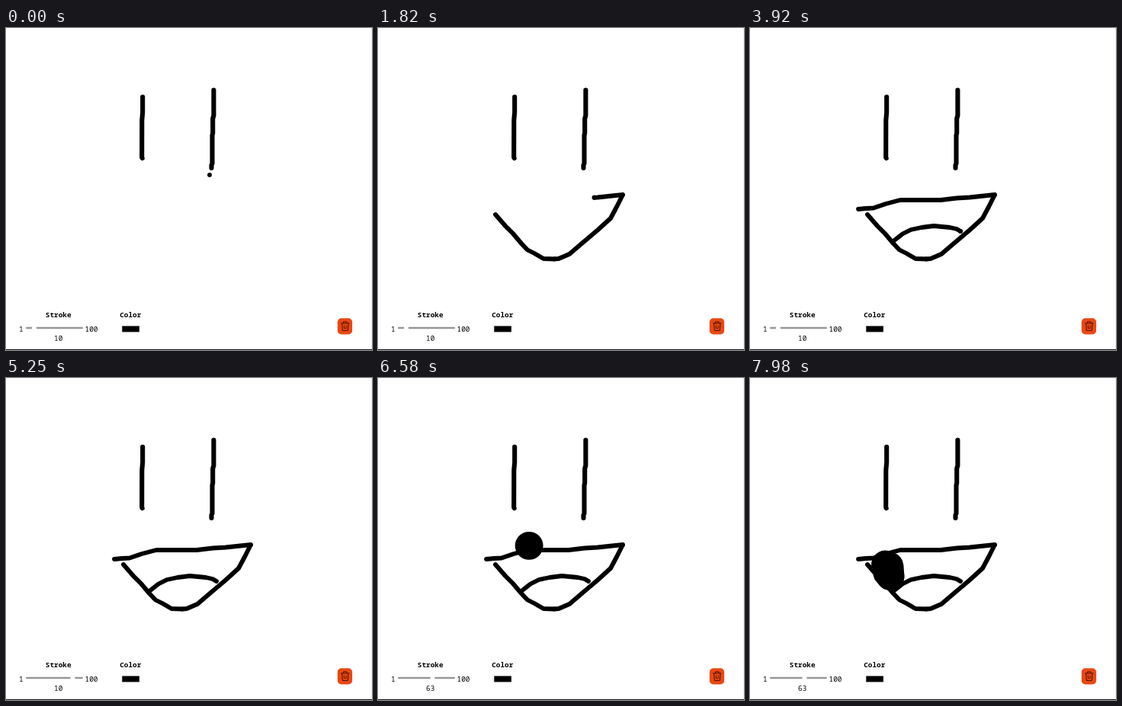
Recreate the animation shown at these times as an HTML page. Size 480 px wide and 423 px high, loop 8 s.

```html
<!DOCTYPE html>
<html lang="en">
<head>
<meta charset="utf-8">
<title>Drawing board</title>
<style>
  html, body { margin: 0; width: 100%; height: 100%; overflow: hidden; background: #fff; }
  svg { display: block; width: 480px; height: 423px; }
  text { font: 500 9.4px "Noto Sans Mono", "DejaVu Sans Mono", monospace; }
  .label { font-weight: 600; }
  .ink { fill: none; stroke: #000; stroke-linecap: round; stroke-linejoin: round; }
  .mid { text-anchor: middle; }
  .bin { fill: none; stroke: #4a1000; stroke-linecap: round; stroke-linejoin: round; }
</style>
</head>
<body>
<svg viewBox="0 0 480 423">
  <rect width="480" height="423" fill="#ddd"/>
  <rect width="479.500" height="430" rx="2" fill="#fff"/>
  <rect y="422" width="480" height="1" fill="#161014"/>

  <g class="ink" stroke-width="6.1">
    <path d="M179.200 90.500V111L178.300 121 178.200 170 178.700 171"/>
    <path d="M272.400 81.500V115L271.200 119V138L270.500 141V178L269.500 180V184"/>
  </g>
  <g id="drawing" class="ink"></g>
  <circle id="cursor"/>

  <text class="label mid" x="68.700" y="380.200">Stroke</text>
  <text x="17" y="398.500">1</text>
  <rect x="26" y="392.800" width="75" height="2.400" rx="1.200" fill="#979797"/>
  <circle id="thumb" cy="394.300" r="3" fill="#fff"/>
  <text x="103.500" y="398.500">100</text>
  <text id="size" class="mid" x="68.700" y="410.700"></text>
  <text class="label mid" x="163.300" y="380.200">Color</text>
  <rect x="150.500" y="389.500" width="26" height="11" rx="1.500" fill="#fff" stroke="#f4f4f4"/>
  <rect x="152.300" y="391.500" width="22.600" height="7.800"/>

  <rect x="434.800" y="381.300" width="19.300" height="21.200" rx="5" fill="#ea4813"/>
  <g class="bin" transform="translate(0 .4)">
    <path d="M439.500 387.500H450M442.500 387V385.500H447V387M440.700 388L441.300 397H448.300L449 388"/>
    <path stroke-width=".8" d="M443.400 390.500V394H446.200V390.500"/>
  </g>
</svg>
<script>
const LOOP = 8000, STEP = 70, SCALE = 0.585;
const $ = id => document.getElementById(id);

// Pointer legs: start, end, pen down, path
const legs = [
  [0, 600, 0, 'M267 193L235 205 190 228 154 245'],
  [600, 1120, 1, 'M154 245L167 260 177 270 188 283 196 291.500 205 296 217 303 231 303.500'],
  [1120, 1680, 1, 'M231 303.500L237 303 251 297 265 285 288 265.500 305 250 313 235 321 219'],
  [1710, 2240, 1, 'M321 219L288 222.500 271 223.500 250 226H197L178 231 162 236.500 152 237 142 238'],
  [2380, 2450, 0, 'M142 238L149 242'],
  [2450, 2730, 0, 'M149 242L175 264 207 280.500'],
  [2730, 3220, 0, 'M207 280.500L196 283 188.500 280.500'],
  [3240, 3850, 1, 'M188 280L200 270.500 211 265 225 262 241 260 262 262 271 264 276 267'],
  [3920, 4060, 0, 'M276 267L265 289'],
  [4060, 4200, 0, 'M265 289L180 325 95 359'],
  [5880, 6090, 0, 'M85 345L123.500 315'],
  [6090, 6230, 0, 'M123.500 315L165 260 206 213'],
  [6370, 7210, 0, 'M206 213L190 228 177.500 245'],
  [7210, 7980, 1, 'M177.500 245L180 250 184 260 180 256 183 247 184 260.500']
].map(([start, end, pen, d]) => {
  const path = document.createElementNS('http://www.w3.org/2000/svg', 'path');
  path.setAttribute('d', d);
  path.setAttribute('stroke-width', SCALE * (start < 5400 ? 10 : 63));
  $('drawing').append(path);
  return { start, end, pen, path, length: path.getTotalLength() };
});

// Slider thumb: time, centre
const thumbStops = [[0, 37], [5110, 52], [5180, 70], [5250, 87.5], [5320, 71.5]];

function draw(t) {
  const size = t < 5460 ? 10 : 63;
  let point;
  for (const { start, end, pen, path, length } of legs) {
    const reached = length * Math.min(1, Math.max(0, (t - start) / (end - start)));
    const begun = t >= start;
    path.style.display = pen && begun ? '' : 'none';
    path.style.strokeDasharray = `${Math.max(0.01, reached)} 2000`;
    if (begun) point = path.getPointAtLength(reached);
  }
  const cursor = $('cursor');
  cursor.style.display = t > 4200 && t < 5880 ? 'none' : '';
  cursor.setAttribute('cx', point.x);
  cursor.setAttribute('cy', point.y);
  cursor.setAttribute('r', size * SCALE / 2);
  $('thumb').setAttribute('cx', thumbStops.findLast(s => s[0] <= t)[1]);
  $('size').textContent = size;
}

const origin = performance.now();
function frame() {
  const t = (performance.now() - origin) % LOOP;
  draw(Math.floor(t / STEP) * STEP);
  requestAnimationFrame(frame);
}
frame();
</script>
</body>
</html>
```
